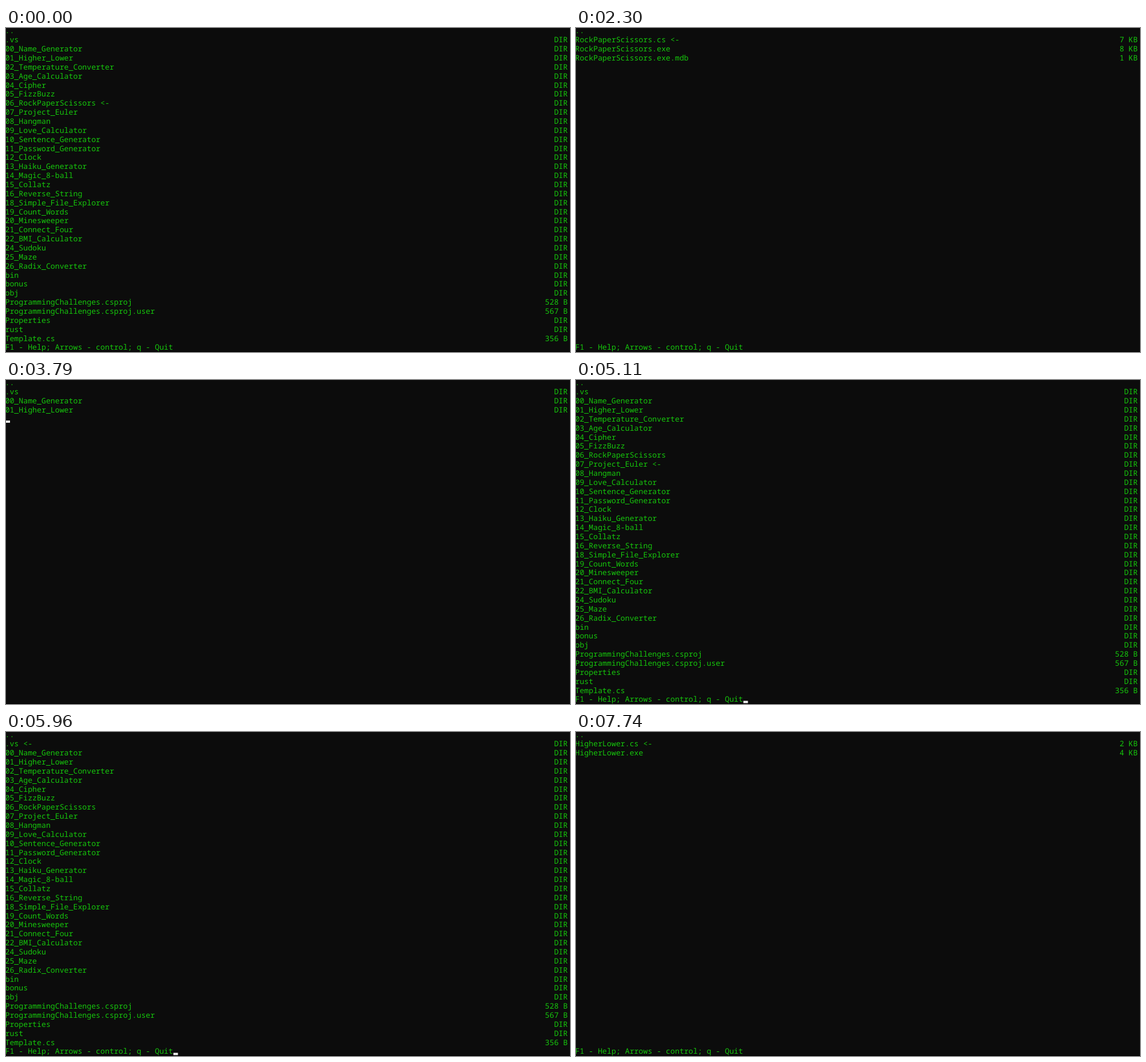
Write an HTML page that moves like this. It is 986 px wide and 568 px high and loops after 8 s.

```html
<!DOCTYPE html>
<html lang="en">
<head>
<meta charset="utf-8">
<title>File explorer</title>
<style>
  html, body { margin: 0; width: 100%; height: 100%; overflow: hidden; background: #0c0c0c; }
  body { position: relative; --col: 7.935px; --row: 15.853px; }
  body::after {
    content: ""; position: absolute; left: 0; right: 0; bottom: 0; height: 1px; background: #000;
  }
  #screen, #caret { position: absolute; left: -1.5px; top: -2.6px; }
  #screen {
    margin: 0; color: #16c60c; white-space: pre;
    font: 13.225px/var(--row) "Noto Sans Mono", "DejaVu Sans Mono", monospace;
    font-variant-ligatures: none; text-rendering: geometricPrecision;
  }
  #caret {
    width: 8px; height: 4px; background: #f2f2f2;
    transform: translate(calc(var(--x) * var(--col)), calc(var(--y) * var(--row) + 10.6px));
  }
</style>
</head>
<body>
<pre id="screen"></pre>
<div id="caret"></div>
<script>
const COLS = 124, ROWS = 35, LOOP = 8000;
const HELP = 'F1 - Help; Arrows - control; q - Quit';

// An entry is "name" for a directory or "name|size" for a file.
const root = `..|
.vs
00_Name_Generator
01_Higher_Lower
02_Temperature_Converter
03_Age_Calculator
04_Cipher
05_FizzBuzz
06_RockPaperScissors
07_Project_Euler
08_Hangman
09_Love_Calculator
10_Sentence_Generator
11_Password_Generator
12_Clock
13_Haiku_Generator
14_Magic_8-ball
15_Collatz
16_Reverse_String
18_Simple_File_Explorer
19_Count_Words
20_Minesweeper
21_Connect_Four
22_BMI_Calculator
24_Sudoku
25_Maze
26_Radix_Converter
bin
bonus
obj
ProgrammingChallenges.csproj|528 B
ProgrammingChallenges.csproj.user|567 B
Properties
rust
Template.cs|356 B`.split('\n');
const rock = ['..|', 'RockPaperScissors.cs|7 KB', 'RockPaperScissors.exe|8 KB', 'RockPaperScissors.exe.mdb|1 KB'];
const euler = ['..|', 'ProjectEuler.cs|3 KB', 'ProjectEuler.exe|5 KB'];
const higher = ['..|', 'HigherLower.cs|2 KB', 'HigherLower.exe|4 KB'];

const HOME = [HELP.length, ROWS];

// [start ms, entries, selected row, caret cell or null, rows drawn so far]
const steps = [
  [0, root, 8, null],
  [1220, root, 8, HOME],
  [1610, rock, 1, HOME],
  [2300, rock, 1, null],
  [2850, root, 1, HOME],
  [3330, root, 2, [HELP.length + 1, ROWS]],
  [3400, root, 2, HOME],
  [3550, root, 3, HOME],
  [3790, root, -1, [0, 4], 4],
  [3870, root, 4, HOME],
  [4020, root, 5, HOME],
  [4320, root, 6, HOME],
  [4560, root, 7, HOME],
  [4650, root, 8, HOME],
  [5110, root, 9, HOME],
  [5500, euler, 1, HOME],
  [5960, root, 1, HOME],
  [6200, root, 2, HOME],
  [6350, root, 3, HOME],
  [6730, higher, -1, [0, 1], 1],
  [6820, higher, 1, HOME],
  [7740, higher, 1, null]
];

const screenEl = document.getElementById('screen');
const caretEl = document.getElementById('caret');

function formatLine(entry, selected) {
  const [name, size = 'DIR'] = entry.split('|');
  const label = selected ? name + ' <-' : name;
  return label.padEnd(COLS - size.length) + size;
}

function draw([, entries, selected, caret, drawn]) {
  const lines = entries.slice(0, drawn).map((entry, i) => formatLine(entry, i === selected));
  if (drawn === undefined) lines[ROWS] = HELP;
  screenEl.textContent = lines.join('\n');
  caretEl.hidden = !caret;
  if (caret) {
    caretEl.style.setProperty('--x', caret[0]);
    caretEl.style.setProperty('--y', caret[1]);
  }
}

let shown;
function tick() {
  const time = performance.now() % LOOP;
  const step = steps.findLast(s => s[0] <= time);
  if (step !== shown) draw(shown = step);
  requestAnimationFrame(tick);
}
tick();
</script>
</body>
</html>
```
